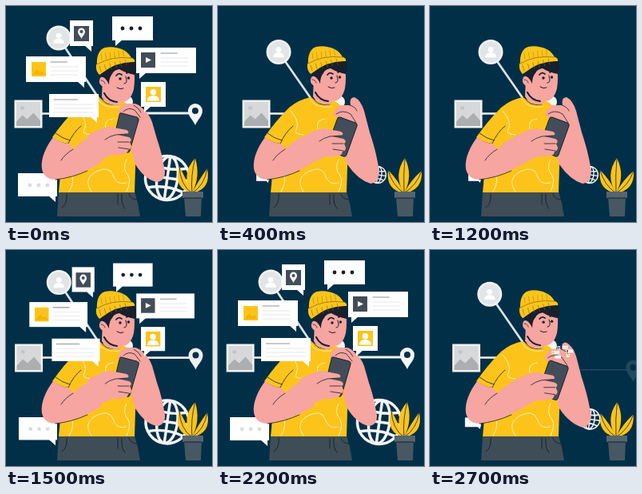
These frames come from a looping animation (258 by 270 pixels, 2800 ms). An HTML page:

```html
<!DOCTYPE html>
<html lang="en">
<head>
<meta charset="utf-8">
<title>Sharing from a phone</title>
<style>
html, body { margin: 0; width: 100%; height: 100%; overflow: hidden; background: #022f48; }
svg { display: block; width: 258px; height: 270px; }
</style>
</head>
<body>
<svg id="stage" viewBox="0 0 258 270" fill="none" stroke-linecap="round" stroke-linejoin="round"></svg>
<script>
const LOOP = 2800, STEP = 100, MOVE = 310;
const YELLOW = '#fcc41a', SKIN = '#f6a5a0', INK = '#17202b', SLATE = '#434d59', NAVY = '#022f48';
const stage = document.getElementById('stage');

const ease = u => {
  u = Math.min(1, Math.max(0, u));
  return u < .5 ? 4 * u ** 3 : 1 - 4 * (1 - u) ** 3;
};
// 0 = everything spread out, 1 = everything folded into the phone
const folded = t => ease(t / MOVE) - ease((t - 1250) / MOVE) + ease((t - 2488) / MOVE);

const lerp = (a, b, k) => a + (b - a) * k;
const morph = (a, b, k) => {
  const ends = b.match(/-?[\d.]+/g);
  let i = 0;
  return a.replace(/-?[\d.]+/g, n => lerp(+n, +ends[i++], k).toFixed(2));
};

const shape = (d, fill, more = '') => `<path d="${d}" fill="${fill}" ${more}/>`;
const line = (d, color = INK, width = 1) => `<path d="${d}" stroke="${color}" stroke-width="${width}"/>`;
const box = (x, y, w, h, fill) => `<rect x="${x}" y="${y}" width="${w}" height="${h}" fill="${fill}"/>`;
const dot = (x, y, r, fill) => `<circle cx="${x}" cy="${y}" r="${r}" fill="${fill}"/>`;
const group = (transform, content) => `<g transform="${transform}">${content}</g>`;
const shift = (x, y) => `translate(${x} ${y})`;

const bust = (x, y, s, fill) => group(`${shift(x, y)} scale(${s})`,
  dot(0, -3.5, 4, fill) + shape('M-8 8Q-8 1 0 1Q8 1 8 8Z', fill));
const marker = (x, y, s, hole) => group(`${shift(x, y)} scale(${s})`,
  shape('M0 18C-3 11-9 7-9 0A9 9 0 0 1 9 0C9 7 3 11 0 18Z', '#f4f5f6') + dot(0, 0, 4, hole));

// Speech bubble whose tail hangs from the left (-1) or right (1) corner
function bubble(x, y, w, h, side, content) {
  const edge = side < 0 ? x + 4 : x + w - 2;
  return box(x, y, w, h, '#fff') + shape(`M${edge} ${y + h + 7}V${y + h - 1}H${edge - side * 9}Z`, '#fff') + content;
}
const dots = (x, y, fill) => [0, 11, 22].map(dx => dot(x + dx, y, 2.4, fill)).join('');
const textLines = (x, y, w) => line(`M${x} ${y}h${w * .6}`, '#8d949b', 1.1) +
  [6, 11, 16].map(dy => line(`M${x} ${y + dy}h${w}`, '#e1e3e5', .8)).join('');

const bubbles = () =>
  bubble(80, 18, 29, 32, 1, box(85, 25, 19, 19, SLATE) + marker(94.5, 32, .5, SLATE)) +
  bubble(133, 13, 51, 30, -1, dots(146, 28, INK)) +
  bubble(163, 52, 75, 32, -1, box(169, 58, 18, 19, SLATE) +
    shape('M175 64L182 67.5L175 71Z', '#fff') + textLines(194, 59, 34)) +
  bubble(25, 63, 75, 32, 1, box(32, 70, 18, 18, YELLOW) +
    shape('M33 86L39 79L43 83L46 81L49 86Z', '#f5b400') + textLines(56, 70, 34)) +
  bubble(54, 110, 62, 29, 1, textLines(60, 117, 49)) +
  bubble(169, 95, 31, 31, -1, box(175, 101, 19, 19, YELLOW) + bust(184.5, 111, .95, '#fff'));

const globe = () => `<g stroke="#f4f5f6" stroke-width="3.5"><circle r="27.5"/><ellipse rx="13" ry="27"/>
  <path d="M0-27V27M-27 0H27M-22-15Q0-8 22-15M-22 15Q0 8 22 15"/></g>`;

const picture = () => box(0, 0, 35, 35, '#f1f2f2') + box(2.5, 2.5, 30, 30, '#d6d8d9') + dot(10, 10, 2.5, '#c3c6c8') +
  shape('M2.5 27L10 19L16 24L24 16L32.5 26V32.5H2.5Z', '#acaeb0');

// A leaf from the pot to its tip, bent towards (cx, cy)
function leaf(x, y, cx, cy, width) {
  const bx = 233, by = 234, length = Math.hypot(x - bx, y - by);
  const nx = (by - y) / length * width, ny = (x - bx) / length * width;
  return shape(`M${bx} ${by}Q${cx - nx} ${cy - ny} ${x} ${y}Q${cx + nx} ${cy + ny} ${bx} ${by}`, YELLOW) +
    line(`M${bx} ${by}Q${cx} ${cy} ${x} ${y}`, INK, .8);
}
const plant = k =>
  leaf(lerp(237, 234, k), 190, lerp(231, 232, k), 212, 13) +
  leaf(lerp(217, 213, k), lerp(200, 205, k), 218, 224, 10) +
  leaf(lerp(252, 255, k), lerp(203, 206, k), 249, 224, 10) +
  shape('M223 239H245L244 263H225Z', '#475862') + box(221, 232, 26, 8, '#55656f') + line('M223 240H245');

const head = () =>
  shape('M120 90L119 113Q126 126 143 122L141 109Z', SKIN) +
  line('M122 108Q127 118 138 119', INK, 2) +
  shape('M122 82L159 73Q161 91 159 103Q155 119 144 119Q132 116 128 102Z', SKIN) +
  shape('M117 84Q136 67 160 68Q164 76 160 85Q149 83 141 78Q134 79 132 84Q128 88 128 97Q120 93 117 84Z', INK) +
  shape('M127 95Q121 85 117 89Q114 95 119 99Q123 102 128 98Z', SKIN) + line('M118 92Q122 92 123 96', INK, .7) +
  shape('M113 73C112 61 116 53 123 51C131 49 139 51 144 53C151 56 155 61 157 66Z', YELLOW) +
  shape('M115 84Q111 79 112 72Q131 61 157 64Q161 66 160 69Q138 68 119 83Q116 86 115 84Z', YELLOW) +
  line('M113 72Q131 61 156 64', '#80651a', .7) +
  [0, 1, 2, 3, 4, 5].map(i => line(`M${116 + i * 6.4} ${74 - i * 1.6}l2 7`, '#80651a', .6) +
    line(`M${119 + i * 5.5} ${66 - i * .8}l-1 -7`, '#9d7c17', .5)).join('') +
  line('M137 86Q140 82 144 85M150 83Q153 81 157 83', INK, 1.7) +
  dot(142, 90, 1.7, INK) + dot(152.5, 89, 1.7, INK) +
  line('M149 87Q152 96 147 96M138 101Q142 104 146 102', INK, 1);

const shirt = () =>
  shape('M116 114Q101 117 89 127Q72 144 58 164Q68 171 79 172L68 211L66 233H161L164 140Q157 123 142 117Q133 125 116 114Z', YELLOW) +
  line('M118 113Q123 126 140 123', INK, .8) + line('M115 116Q122 129 142 126', '#fff0b5', .8) +
  line('M78 172Q84 158 94 150M62 159Q71 166 80 168', INK, .8) +
  line('M91 131Q103 144 98 155Q94 160 107 161M107 232Q96 216 113 207Q129 199 134 211Q138 225 151 221M134 141Q122 142 125 153M151 192Q145 203 153 212Q157 220 151 232M80 205Q88 219 79 232', '#fff4c9', .9);

const trousers = () =>
  shape('M66 232H161Q166 247 168 263H64Z', '#3f4d57') +
  line('M76 235Q77 248 70 252M140 235V248M145 235Q144 248 149 253M154 235Q156 242 164 242', INK, .9);

function arms(k) {
  const rightArm = morph(
    'M140 134Q142 125 150 122L160 122Q165 122 170 127Q179 134 183 145L189 166C195 183 197 195 199 207Q199 219 189 220Q174 217 162 198L157 181L165 142Q157 136 147 137Z',
    'M144 136Q146 127 154 124L166 124Q164 114 171 114Q179 118 183 131L190 158C197 179 200 193 202 207Q201 221 191 222Q175 217 162 198L158 186L172 149Q160 140 150 140Z', k);
  const fingers = morph('M147 132Q153 126 161 130L168 139M160 124Q167 128 169 133',
    'M148 135Q156 129 166 135L173 146M165 124Q172 126 174 131', k);
  const phone = morph('M142 136Q142 133 145 134L164 139Q167 140 166 143L155 181Q154 184 151 183L133 175Z',
    'M149 142Q150 138 153 139L172 146Q175 147 174 150L161 186Q160 189 157 188L136 179Z', k);
  const hand = 'M105 164Q122 154 133 153L154 157Q159 160 154 162L143 163L157 166Q162 169 158 172L160 177Q160 181 156 182Q155 188 149 187Q143 189 135 188Q122 194 111 200Z';
  return shape(rightArm, SKIN) + line(fingers, INK, .8) +
    shape(phone, SLATE, `stroke="${INK}" stroke-width="1"`) +
    shape('M59 164C50 176 43 191 45 204Q48 217 63 217C83 215 106 204 120 195L114 160C102 164 92 171 84 179L79 172Q68 171 59 164Z', SKIN) +
    group(shift(lerp(-3, 0, k), lerp(-2, 0, k)),
      shape(hand, SKIN) + line('M154 162L140 163Q132 165 127 169M157 172L143 172M157 181L144 179', INK, .8)) +
    line('M84 179Q73 186 69 193M62 217Q82 215 102 206', INK, .8);
}

function scene(k) {
  const ax = lerp(66, 76, k), ay = lerp(40, 57.5, k);
  const px = lerp(237, 257, k), py = lerp(131, 149, k);
  const ix = lerp(10.5, 30.5, k), spread = 1 - k;
  return line(`M${ax} ${ay}L116 115`, '#dce2e6', 2.7) + line(`M${ix + 30} 134.5H110`, '#f0f2f3', 2.6) +
    `<g opacity="${Math.max(0, spread)}">` +
      line(`M150 ${py + 3}H${px - 7}`, '#f0f2f3', lerp(2.8, 1.2, k)) + marker(px, py, 1, NAVY) + '</g>' +
    dot(ax, ay, 15.5, '#f1f2f2') + dot(ax, ay, 13, '#e2e5e7') + bust(ax, ay, .85, '#fff') +
    group(shift(ix, 117.5), picture()) +
    group(`${shift(lerp(202, 200, k), lerp(215, 211, k))} rotate(8) scale(${lerp(1, .38, k)})`, globe()) +
    group(`${shift(lerp(15, 48, k), lerp(209, 209.5, k))} scale(${lerp(1, .32, k)})`,
      bubble(0, 0, 49, 29, 1, dots(15, 15, '#d9dcde'))) +
    plant(k) + dot(151, 120, 8, '#f4f5f6') + trousers() + shirt() +
    group(shift(spread, spread), head()) + arms(k) +
    (spread > .005 ? group(`translate(171 135) scale(${spread}) translate(-171 -135)`, bubbles()) : '');
}

let shown = -1;
function tick() {
  const t = Math.floor(performance.now() % LOOP / STEP) * STEP;
  if (t !== shown) stage.innerHTML = scene(folded(shown = t));
  requestAnimationFrame(tick);
}
tick();
</script>
</body>
</html>
```
